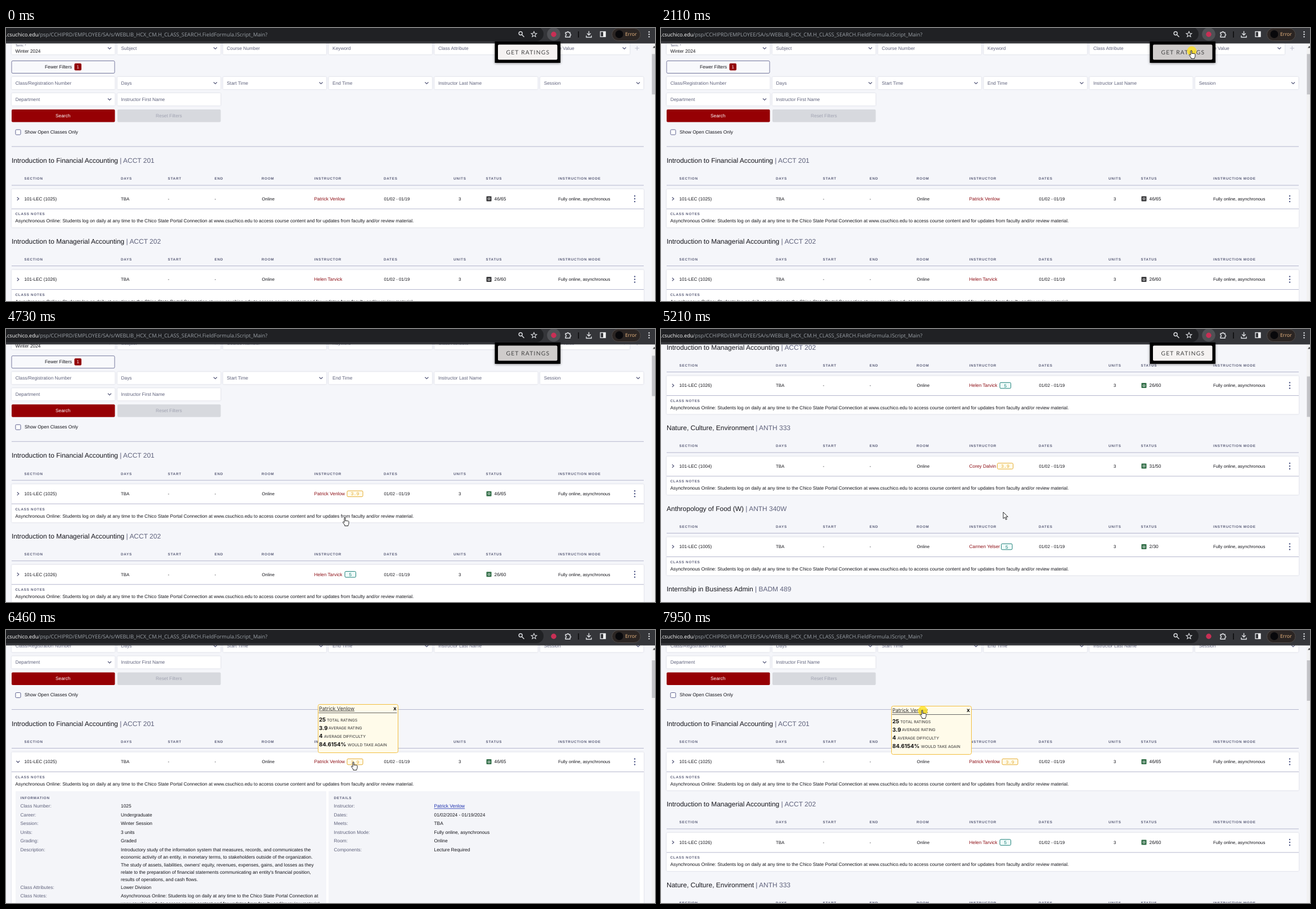
An HTML page for the animation above (8000 ms loop, 1153 by 486 pixels).

```html
<!DOCTYPE html>
<html lang="en">
<head>
<meta charset="utf-8">
<title>Class search</title>
<style>
html, body { margin: 0; height: 100%; overflow: hidden; background: #f5f6fa; }
svg { display: block; width: 100vw; height: 100vh; }
text { font-family: "Liberation Sans", Arial, sans-serif; fill: #16161c; text-rendering: geometricPrecision; white-space: pre; }
.mute { fill: #5f627c; }
.head { font-weight: bold; letter-spacing: .78px; fill: #5a5d78; }
.name { fill: #8c0d14; }
.link { fill: #1c2fae; text-decoration: underline; }
.mono { font-family: "Liberation Mono", monospace; }
.url { font-family: "Open Sans", sans-serif; fill: #9aa0a6; }
.cta { font-family: Lato, sans-serif; letter-spacing: 1.2px; fill: #444; }
.tip { font-family: Inter, sans-serif; fill: #333; }
.big { font-weight: bold; fill: #111; }
.white { fill: #fff; }
.card { fill: #fff; filter: drop-shadow(0 .5px .8px #c9cbd8); }
.line { stroke: #b4b6cd; stroke-width: 1; }
.icon { fill: none; stroke: #dfe1e5; stroke-width: 1.4; }
.chev { fill: none; stroke: #55587a; stroke-width: 1.2; }
.status { fill: var(--status); }
</style>
</head>
<body>
<svg id="stage" viewBox="0 0 1153 486" preserveAspectRatio="none"></svg>
<script>
const stage = document.getElementById('stage');
const $ = id => document.getElementById(id);

// Text is placed by its left edge and the vertical centre of its capitals.
const text = (x, mid, str, cls = '', size = 8.33) =>
  `<text x="${x}" y="${mid + size * .36}" font-size="${size}" class="${cls}">${str}</text>`;
const rect = (x, y, w, h, attrs = '') => `<rect x="${x}" y="${y}" width="${w}" height="${h}" ${attrs}/>`;
const line = (x, y, w, attrs = 'class="line"') => `<path d="M${x} ${y}h${w}" ${attrs}/>`;
const path = (d, attrs = 'class="icon"') => `<path d="${d}" ${attrs}/>`;
const dot = (x, y, r, fill) => `<circle cx="${x}" cy="${y}" r="${r}" fill="${fill}"/>`;
const down = (x, y) => path(`M${x - 3} ${y - 1.5}l3 3 3-3`, 'class="chev"');
const dots = (x, y, gap, r, fill) => [-gap, 0, gap].map(d => dot(x, y + d, r, fill)).join('');

const people = ['Patrick Venlow', 'Helen Tarvick', 'Corey Dalvin', 'Carmen Yelser'];
const note = ['Asynchronous Online: Students log on daily at any time to the Chico State Portal Connection at',
  'www.csuchico.edu to access course content and for updates from faculty and/or review material.'];
const PITCH = 143.5;

function field(x, mid, label, arrow, w = 183.5) {
  return rect(x, mid - 11, w, 22, 'rx="1.5" class="card"') + text(x + 6.7, mid, label, 'mute') +
    (arrow ? down(x + w - 9.5, mid) : '');
}

function filters() {
  const col = i => 10 + 187.8 * i;
  return rect(10, 24, 183.5, 23, 'rx="1.5" class="card"') + text(16.5, 30.5, 'Term: *', 'mute', 6) +
    text(16.5, 41, 'Winter 2024') + down(184, 36) +
    field(col(1), 36, 'Subject', 1) + field(col(2), 36, 'Course Number') + field(col(3), 36, 'Keyword') +
    field(col(4), 36, 'Class Attribute', 1) + field(col(5), 36, 'Attribute Value', 1, 159) +
    path('M1117.500 36h7.500m-3.750-3.750v7.500', 'stroke="#b9bbc9"') +
    rect(10, 58.5, 183, 22, 'rx="2" fill="#f8f9fc" stroke="#74779c"') + text(69, 69, 'Fewer Filters') +
    rect(121.5, 63, 12.5, 12.5, 'rx="2" fill="#930005"') + text(125.5, 69.2, '1', 'white', 8) +
    field(col(0), 98, 'Class/Registration Number') + field(col(1), 98, 'Days', 1) +
    field(col(2), 98, 'Start Time', 1) + field(col(3), 98, 'End Time', 1) +
    field(col(4), 98, 'Instructor Last Name') + field(col(5), 98, 'Session', 1) +
    field(col(0), 127, 'Department', 1) + field(col(1), 127, 'Instructor First Name') +
    rect(10, 145, 183.5, 22.5, 'rx="2" fill="#960004"') + text(88, 156, 'Search', 'white') +
    rect(198, 145, 183.5, 22.500, 'rx="2" fill="#d7d9de"') + `<g opacity=".45">${text(266, 156, 'Reset Filters', 'mute')}</g>` +
    rect(17, 181, 9, 9, 'rx="1.5" fill="#fff" stroke="#5d618f"') + text(33, 185, 'Show Open Classes Only') +
    line(10, 211, 1123);
}

function badge(x, mid, score) {
  const high = score === '5', w = high ? 19.5 : 28, ink = high ? '#1c7f78' : '#e6ad33';
  return `<g class="rate">${rect(x, mid - 5.2, w, 10.5, `rx="2" fill="${high ? '#effcfa' : '#fffbea'}" stroke="${ink}"`)}
    <g style="--ink:${ink}"><text class="mono" style="fill:var(--ink)" x="${x + (high ? 7.3 : 6.5)}" y="${mid + 3}" font-size="8.33">${score}</text></g></g>`;
}

function title(top, name, code) {
  return `<text x="10" y="${top + 4.2}" font-size="11.97">${name}<tspan class="mute"> | ${code}</tspan></text>`;
}

function section(i, name, code, id, seats, score, badgeX) {
  const top = 236 + PITCH * i, mid = top + 68;
  const heads = [[32.5, 'SECTION'], [204, 'DAYS'], [287.5, 'START'], [370.5, 'END'], [454, 'ROOM'],
    [547.5, 'INSTRUCTOR'], [671, 'DATES'], [795, 'UNITS'], [852.5, 'STATUS'], [981, 'INSTRUCTION MODE']];
  const cells = [[204, 'TBA'], [287.5, '-'], [370.5, '-'], [454.5, 'Online'], [671.5, '01/02 - 01/19'],
    [804, '3'], [981, 'Fully online, asynchronous']];
  return title(top, name, code) +
    heads.map(([x, s]) => text(x, top + 32, s, 'head', 6.25)).join('') +
    line(10, top + 44, 1123) +
    rect(10, top + 51, 1123, 68, `rx="1.5" class="card"${i ? '' : ' id="card"'}`) +
    line(10, top + 86, 1123) +
    path(`M${19.8} ${mid - 2.8}l3 2.8-3 2.8`, `class="chev"${i ? '' : ' id="toggle"'}`) +
    text(32.5, mid, `101-LEC (${id})`, '', 8.1) +
    cells.map(([x, s]) => text(x, mid, s, '', 7.8)).join('') +
    text(547.5, mid, people[i], 'name') + badge(badgeX, mid, score) +
    rect(853.5, mid - 4.5, 9, 9, 'rx="1" class="status"') + text(855.7, mid, 'O', 'white head', 6) +
    text(867.5, mid, seats) + dots(1117, mid, 5, 1.2, '#4d5685') +
    text(16.5, top + 95, 'CLASS NOTES', 'head', 6.25) + text(16.5, top + 107.5, note.join(' '));
}

function detail() {
  const top = 368, row = i => top + 15 + 15.5 * i;
  const about = ['Introductory study of the information system that measures, records, and communicates the',
    'economic activity of an entity, in monetary terms, to stakeholders outside of the organization.',
    "The study of assets, liabilities, owners' equity, revenues, expenses, gains, and losses as they",
    "relate to the preparation of financial statements communicating an entity's financial position,",
    'results of operations, and cash flows.'];
  const list = (x, valueX, pairs) => pairs.map(([k, v], i) =>
    text(x, row(i), k + ':', 'mute') + text(valueX, row(i), v, v === people[0] ? 'link' : '')).join('');
  return rect(17, top - 11.5, 552, 260, 'fill="#f4f5f9"') + rect(573, top - 11.5, 553, 260, 'fill="#f4f5f9"') +
    text(25.5, top, 'INFORMATION', 'head', 6.25) + text(582.5, top, 'DETAILS', 'head', 6.25) +
    list(25.5, 204, [['Class Number', '1025'], ['Career', 'Undergraduate'], ['Session', 'Winter Session'],
      ['Units', '3 units'], ['Grading', 'Graded'], ['Description', '']]) +
    about.map((s, i) => text(204, row(5) + 13.3 * i, s)).join('') +
    text(25.5, 527.5, 'Class Attributes:', 'mute') + text(204, 527.5, 'Lower Division') +
    text(25.5, 543, 'Class Notes:', 'mute') + note.map((s, i) => text(204, 543 + 13.3 * i, s)).join('') +
    list(582.5, 760.5, [['Instructor', people[0]], ['Dates', '01/02/2024 - 01/19/2024'], ['Meets', 'TBA'],
      ['Instruction Mode', 'Fully online, asynchronous'], ['Room', 'Online'], ['Components', 'Lecture Required']]);
}

function toolbar() {
  const star = Array.from({ length: 10 }, (_, i) => {
    const a = i * Math.PI / 5, r = i % 2 ? 2.3 : 5.2;
    return `${938 + r * Math.sin(a)} ${11.3 - r * Math.cos(a)}`;
  }).join('L');
  return rect(0, 0, 1153, 27.5, 'fill="#35363a"') + rect(-20, -2, 975, 25.5, 'rx="12.500" fill="#202124"') +
    text(-.5, 11.5, '.csuchico.edu', 'url white', 9.2) +
    text(57, 11.5, '/psp/CCHIPRD/EMPLOYEE/SA/s/WEBLIB_HCX_CM.H_CLASS_SEARCH.FieldFormula.IScript_Main?', 'url', 9.28) +
    path('M917.200 9.500a3 3 0 1 0-6 0a3 3 0 1 0 6 0M916.500 12l4 4') +
    path(`M${star}Z`, 'class="icon" style="stroke-width:1.1"') +
    `<circle id="halo" cx="973" cy="11" r="11.8" fill="#505155"/>` + dot(973, 11.2, 4.7, '#c92f55') +
    path('M994 8h2.700a1.500 1.500 0 0 1 3 0h2.300v2.600a1.500 1.500 0 0 1 0 3v2.600h-8v-2.600a1.500 1.500 0 0 0 0-3z') +
    path('M1017 6v11', 'stroke="#08080a" stroke-width="1.500"') +
    path('M1035.500 5.500v7m-3.200-3l3.200 3.200 3.200-3.200M1031 13.500v3h9v-3') +
    rect(1056, 6.5, 9, 9, 'class="icon"') + rect(1061, 6.5, 4, 9, 'fill="#fff"') +
    rect(1076.5, .5, 50.5, 22, 'rx="11" fill="#2b2523" stroke="#4f4a48"') + dot(1089.5, 11, 7, '#08080b') +
    text(1100, 11.3, 'Error', 'url', 8.7).replace('<text', '<text style="fill:#f3bd86"') +
    dots(1142.5, 11.3, 4.3, 1.2, '#e4e6ea');
}

function tooltip() {
  const rows = [['25', 16, 'TOTAL RATINGS'], ['3.9', 19, 'AVERAGE RATING'], ['4', 11, 'AVERAGE DIFFICULTY'], ['84.6154%', 53, 'WOULD TAKE AGAIN']];
  return rect(.5, .5, 142, 86, 'rx="3" fill="#fffbea" stroke="#f2bd3d"') +
    text(2, 7.5, people[0], 'tip', 9).replace('<text', '<text text-decoration="underline"') +
    text(134, 7.5, 'x', 'tip big', 10) + line(1.5, 15.5, 139, 'stroke="#555" stroke-width=".9"') +
    rows.map(([n, x, s], i) => text(2, 27.5 + 14.6 * i, n, 'tip big', 9.7) + text(x, 28.2 + 14.6 * i, s, 'tip', 7)).join('');
}

stage.innerHTML = rect(0, 0, 1153, 486, 'fill="#f5f6fa"') +
  `<g id="page">${filters()}
    ${section(0, 'Introduction to Financial Accounting', 'ACCT 201', 1025, '46/65', '3.9', 606)}
    <g id="rest">${section(1, 'Introduction to Managerial Accounting', 'ACCT 202', 1026, '26/60', '5', 602)}
    ${section(2, 'Nature, Culture, Environment', 'ANTH 333', 1004, '31/50', '3.9', 597.5)}
    ${section(3, 'Anthropology of Food (W)', 'ANTH 340W', 1005, '2/30', '5', 604.5)}
    ${title(236 + 4 * PITCH, 'Internship in Business Admin', 'BADM 489')}</g>
    <g id="detail">${detail()}</g></g>` +
  rect(1147, 27, 6, 459, 'fill="#f1f1f2"') + path('M1149 35.500h4v-2.500l-1.500-1z', 'fill="#555"') +
  rect(1147.5, 46, 6, 72, 'id="thumb" fill="#c2c2c6"') +
  toolbar() +
  `<g id="popup">${rect(868.5, 24, 116.5, 38, 'style="filter:drop-shadow(0 1px 2px #0007)"')}
    ${rect(874, 29.5, 105.5, 27, 'id="button" rx="2"')}${text(888.5, 43, 'GET RATINGS', 'cta', 10.3)}</g>
  <g id="tip">${tooltip()}</g>
  <g id="cursor" stroke="#111" stroke-width=".9" stroke-linejoin="round" fill="#fff">
    <circle id="click" cx="1" cy="1" r="8.5" fill="#ffe21f" fill-opacity=".8" stroke="none"/>
    <path id="arrow" d="M0 0V11.500L2.700 9 4.600 13.400 6.500 12.600 4.600 8.400H8.300Z"/>
    <path id="hand" d="M-1 .6Q0-.8 1 .6V6Q2 4.600 3 5.600 4 4.600 5 6 6.300 5 7 6.600V10Q7 12 5.800 13V14.500H-.2V13L-3.600 8.400Q-3.600 6.800-2 7.400L-1 8.500Z"/>
  </g>`;

// Keys are [time, ...values]; each segment eases in and out.
function track(keys, t) {
  const i = keys.findIndex(k => k[0] > t);
  if (i === 0) return keys[0].slice(1);
  if (i < 0) return keys[keys.length - 1].slice(1);
  const a = keys[i - 1], b = keys[i], u = (t - a[0]) / (b[0] - a[0]), e = u * u * (3 - 2 * u);
  return a.slice(1).map((v, j) => v + (b[j + 1] - v) * e);
}

const scrollKeys = [[4677, 0], [5190, 347], [5290, 347], [5690, 69.5]];
const tipKeys = [[7590, 554, 132], [7940, 409, 135]];
const cursorKeys = [[930, 975, -20], [1500, 946, 38], [1900, 942, 40], [2250, 942, 40], [2530, 830, 66],
  [3140, 646, 182], [3400, 646, 182], [4170, 602, 336], [4730, 602, 336], [5210, 608, 326], [5700, 627, 296],
  [6150, 620, 234], [6500, 617, 235], [7130, 493, 237], [7270, 490, 237], [7540, 609, 140], [7590, 609, 140], [7940, 464, 143]];
const handTimes = [[1350, 2330], [3870, 4790], [6000, 7320], [7500, 8000]];
const clickTimes = [[2020, 2230], [6220, 6360], [7190, 7290], [7560, 8000]];
const within = (spans, t) => spans.some(([a, b]) => t >= a && t < b);
const show = (el, on) => { el.style.display = on ? '' : 'none'; };
const move = (id, x, y) => $(id).setAttribute('transform', `translate(${x} ${y})`);

function draw(t) {
  const [scroll] = track(scrollKeys, t), open = t >= 6300 && t < 7250, hand = within(handTimes, t);
  move('page', 0, -scroll);
  $('thumb').setAttribute('y', 46.3 + scroll * .11);
  $('thumb').setAttribute('height', open ? 67 : 72);
  stage.style.setProperty('--status', t < 4240 ? '#3b3b3d' : '#35704a');
  document.querySelectorAll('.rate').forEach(el => show(el, t >= 3400));
  show($('rest'), !open);
  show($('detail'), open);
  $('card').setAttribute('height', open ? 340 : 68);
  $('toggle').setAttribute('transform', open ? 'rotate(90 21.3 304)' : '');
  show($('popup'), t < 6230);
  show($('halo'), t < 6230);
  $('button').setAttribute('fill', t >= 1250 && t < 5000 ? '#cfcccb' : '#f5f2f1');
  show($('tip'), t >= 6300);
  move('tip', ...track(tipKeys, t));
  move('cursor', ...track(cursorKeys, t));
  show($('hand'), hand);
  show($('arrow'), !hand);
  show($('click'), within(clickTimes, t));
}

const start = performance.now();
function tick() {
  draw((performance.now() - start) % 8000);
  requestAnimationFrame(tick);
}
tick();
</script>
</body>
</html>
```
